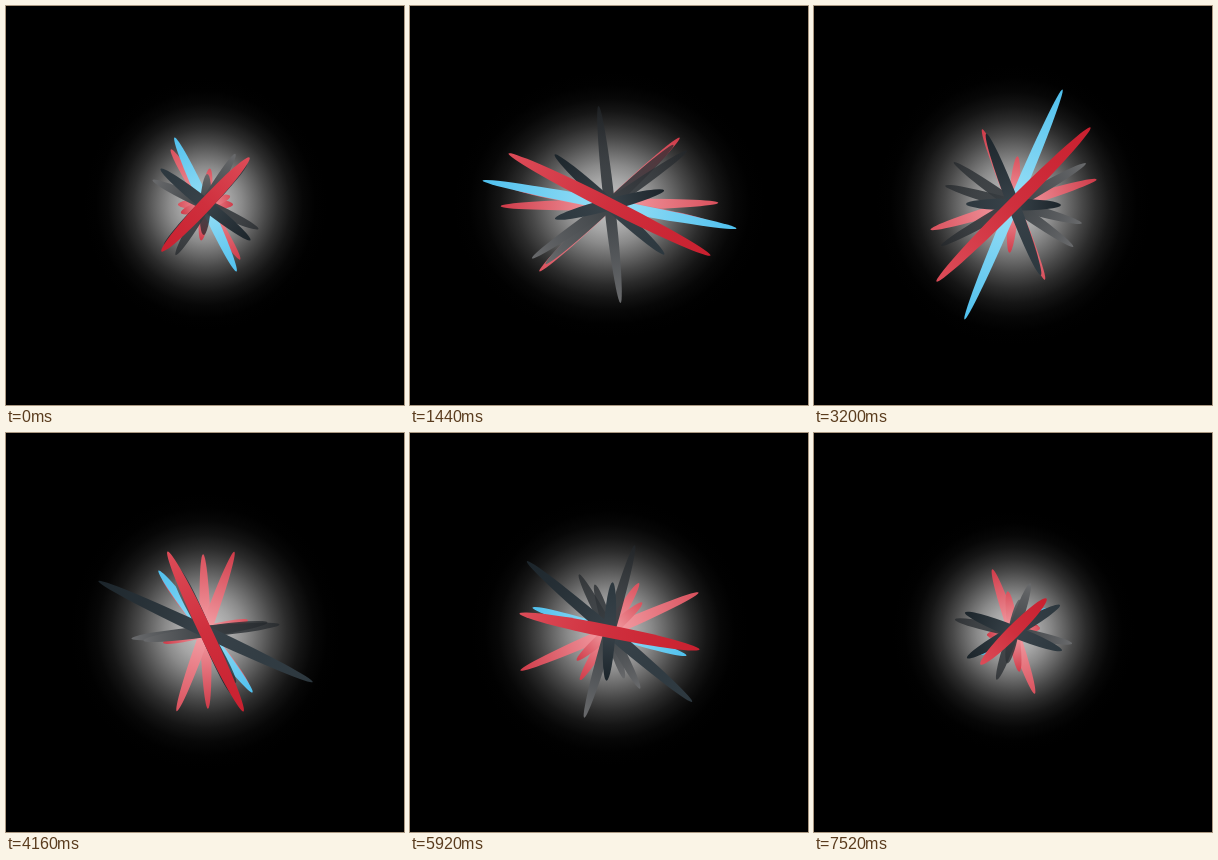
Animation of 398x399 px, one loop 7.6 s. Source, as an HTML page with a canvas:

```html
<!DOCTYPE html>
<html lang="en">
<head>
<meta charset="utf-8">
<title>Pulsing rays</title>
<style>
html, body { margin: 0; width: 100%; height: 100%; overflow: hidden; background: #000; }
canvas { display: block; }
</style>
</head>
<body>
<canvas id="stage" width="398" height="399"></canvas>
<script>
const ctx = document.getElementById('stage').getContext('2d');
const LOOP = 7600, STEP = 80, BEAT = 800, CX = 199.5, CY = 198.5;
const TAU = 2 * Math.PI;

// Half width and colours from the leading tip through the centre to the far tip.
const STYLE = {
  rose:  { w: 5.5, stops: ['#cf3a48', '#f5a4aa', '#d9505c'] },
  cyan:  { w: 5.5, stops: ['#4fc0ee', '#9be0f6', '#4fc0ee'] },
  smoke: { w: 5.5, stops: ['rgba(34,38,42,.7)', '#3d4246', '#68696b'] },
  slate: { w: 6,   stops: ['#1b242a', '#39434a', '#2c373e'] },
  red:   { w: 6.5, stops: ['#c9202f', '#cf2f3d', '#dc4c58'] }
};

// The two leading rays pass through a few set poses (tip offsets from the centre).
const TIMES = [0, 1440, 2240, 3200, 4160, 5920, 7520];
const RED = [[44, -47], [101, 51], [27, -26], [77, -77], [38, 80], [90, 18], [33, -33]];
const CYAN = [[31, 67], [127, 24], [0, 0], [49, -115], [47, 61], [77, 24], [33, -23]];

let seed = 11;
function random(min, max) {
  seed = (seed * 16807) % 2147483647;
  return min + (max - min) * seed / 2147483647;
}

const mix = (a, b, u) => a + (b - a) * u;

// All rays breathe together, three times per loop.
const breath = t => 0.85 - 0.22 * Math.cos(3 * TAU * t / LOOP);

// Spins a whole number of half turns per loop while its length swells.
function freeRay(style, i, count) {
  const angle = Math.PI * (i + random(0, 0.7)) / count;
  const turns = Math.round(random(4, 9)) * (i % 2 ? -1 : 1);
  const swells = Math.round(random(3, 7));
  const reach = random(85, 125), phase = random(0, TAU);
  return t => ({
    style,
    angle: angle + Math.PI * turns * t / LOOP,
    len: breath(t) * reach * (0.72 + 0.28 * Math.sin(phase + swells * TAU * t / LOOP))
  });
}

// Spins about half a turn per beat from one set pose to the next.
function guidedRay(style, tips) {
  let angle = 0;
  const keys = tips.map(([x, y], i) => {
    const ahead = Math.atan2(y, x) - angle;
    const beats = i ? Math.round((TIMES[i] - TIMES[i - 1]) / BEAT) : 1;
    angle += ahead - Math.PI * Math.floor(ahead / Math.PI) + Math.PI * (beats - 1);
    return { angle, len: Math.hypot(x, y) };
  });
  return t => {
    const next = TIMES.findIndex(k => k > t);
    if (next < 0) return { style, ...keys[keys.length - 1] };
    const a = keys[next - 1], b = keys[next];
    const u = (t - TIMES[next - 1]) / (TIMES[next] - TIMES[next - 1]);
    return { style, angle: mix(a.angle, b.angle, u), len: mix(a.len, b.len, u) };
  };
}

const fan = (style, count) =>
  Array.from({ length: count }, (_, i) => freeRay(style, i, count));

// Back to front.
const RAYS = [
  ...fan(STYLE.rose, 4),
  guidedRay(STYLE.cyan, CYAN),
  ...fan(STYLE.smoke, 3),
  ...fan(STYLE.slate, 2),
  guidedRay(STYLE.red, RED)
];

// The halo widens with the spread of the rays on each axis.
function drawGlow(rays) {
  const radius = axis => {
    const sum = rays.reduce((s, r) => s + (r.len * axis(r.angle)) ** 2, 0);
    return 96 + 0.75 * Math.sqrt(sum / rays.length);
  };
  ctx.save();
  ctx.translate(CX, CY);
  ctx.scale(radius(Math.cos), radius(Math.sin));
  const g = ctx.createRadialGradient(0, 0, 0, 0, 0, 1);
  for (let k = 0; k <= 10; k++) {
    const v = Math.round(190 * (0.5 + 0.5 * Math.cos(Math.PI * k / 10)) ** 1.4);
    g.addColorStop(k / 10, `rgb(${v},${v},${v})`);
  }
  ctx.fillStyle = g;
  ctx.beginPath();
  ctx.arc(0, 0, 1, 0, TAU);
  ctx.fill();
  ctx.restore();
}

function drawRay({ style, angle, len }) {
  if (len < 3) return;
  ctx.save();
  ctx.translate(CX, CY);
  ctx.rotate(angle);
  const g = ctx.createLinearGradient(len, 0, -len, 0);
  style.stops.forEach((c, k) => g.addColorStop(k / 2, c));
  ctx.fillStyle = g;
  ctx.beginPath();
  ctx.ellipse(0, 0, len, Math.min(style.w, len * 0.3), 0, 0, TAU);
  ctx.fill();
  ctx.restore();
}

// Moves in steps, with two short rests near the start.
function clock(ms) {
  const t = Math.floor((ms % LOOP) / STEP) * STEP;
  if (t > 320 && t < 560) return 320;
  if (t > 800 && t < 960) return 800;
  return t;
}

function draw(ms) {
  const t = clock(ms);
  const rays = RAYS.map(ray => ray(t));
  ctx.fillStyle = '#000';
  ctx.fillRect(0, 0, 398, 399);
  drawGlow(rays);
  rays.forEach(drawRay);
}

const start = performance.now();
function tick() {
  draw(performance.now() - start);
  requestAnimationFrame(tick);
}
tick();
</script>
</body>
</html>
```
